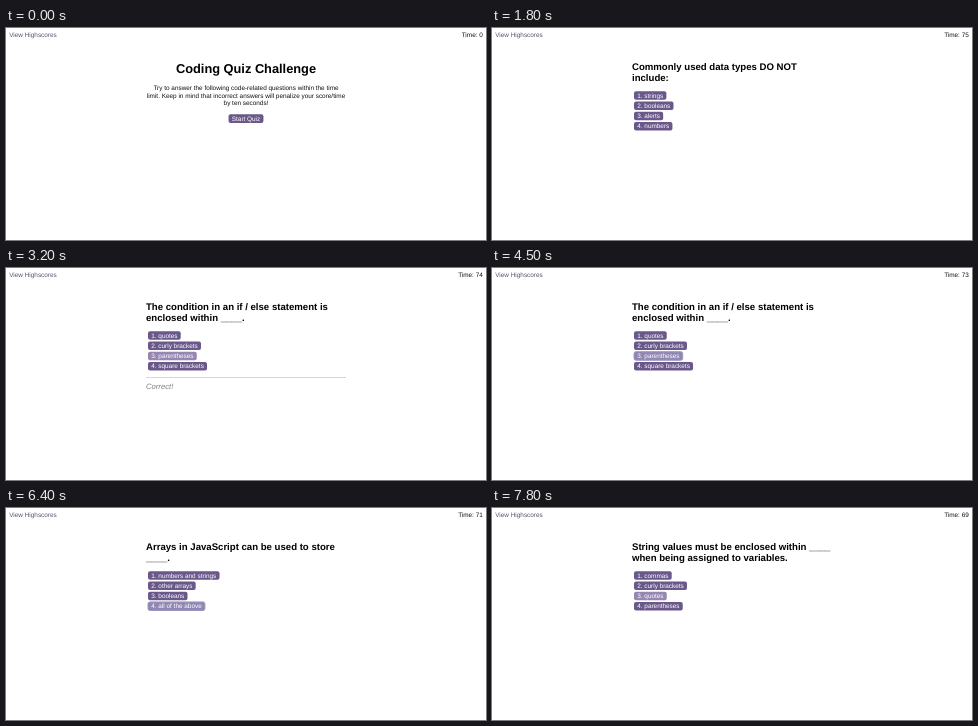
Write an HTML page that moves like this. It is 480x212 px and loops after 8 s.

```html
<!DOCTYPE html>
<html lang="en">
<head>
<meta charset="utf-8">
<title>Coding Quiz</title>
<style>
  html, body { margin: 0; width: 100%; height: 100%; overflow: hidden; background: #fff; }
  svg { display: block; width: 480px; height: 212px; }
  text { font: 16px "Liberation Sans", Arial, sans-serif; text-rendering: geometricPrecision; fill: #111; }
  .h1 { font-size: 32px; font-weight: bold; fill: #000; }
  .h2 { font-size: 24px; font-weight: bold; fill: #000; }
  .mid { text-anchor: middle; }
  .end { text-anchor: end; }
  .link { fill: #5a5270; }
  .label { fill: #fff; }
  .note { font-size: 19.2px; font-style: italic; fill: #808080; }
</style>
</head>
<body>
<svg id="stage" viewBox="0 0 1200 530"></svg>
<script>
const LOOP = 8000;
const QUIZ_START = 1800;
const NOTE_TIME = 1000;
const BASE = [106, 88, 138];
const LIGHT = [150, 135, 177];
const PRESSED = [144, 134, 178];

const questions = [
  { at: 1800, title: ["Commonly used data types DO NOT", "include:"],
    choices: ["strings", "booleans", "alerts", "numbers"] },
  { at: 3200, title: ["The condition in an if / else statement is", "enclosed within ____."],
    choices: ["quotes", "curly brackets", "parentheses", "square brackets"] },
  { at: 4700, title: ["Arrays in JavaScript can be used to store", "____."],
    choices: ["numbers and strings", "other arrays", "booleans", "all of the above"] },
  { at: 6800, title: ["String values must be enclosed within ____", "when being assigned to variables."],
    choices: ["commas", "curly brackets", "quotes", "parentheses"] }
];

// Pointer states: time, button index, highlight amount, pressed
const pointer = [
  [0, 0, 0], [1500, 0, 0.5], [1600, 0, 1], [1700, 0, 1, true],
  [1800, 0, 0], [2600, 2, 0.5], [2700, 2, 1], [3100, 2, 1, true],
  [3200, 2, 1], [4500, 2, 1, true],
  [4700, 2, 0.3], [4800, 2, 1], [5200, 3, 1], [6400, 3, 1, true],
  [6800, 3, 0.3], [6900, 3, 1], [7400, 3, 0], [7500, 2, 1]
];

const stage = document.getElementById("stage");

function add(parent, tag, attrs, content = "") {
  const el = document.createElementNS("http://www.w3.org/2000/svg", tag);
  for (const key in attrs) el.setAttribute(key, attrs[key]);
  el.textContent = content;
  parent.append(el);
  return el;
}

function addText(parent, x, y, cls, content) {
  return add(parent, "text", { x, y, class: cls }, content);
}

function addButton(parent, x, y, label, centred) {
  const rect = add(parent, "rect", { y, height: 21.5, rx: 5, "stroke-width": 2.5 });
  const text = addText(parent, 0, y + 16.2, "label", label);
  const width = text.getComputedTextLength() + 16;
  const left = centred ? x - width / 2 : x;
  rect.setAttribute("x", left);
  rect.setAttribute("width", width);
  text.setAttribute("x", left + 8);
  return rect;
}

function paint(rect, amount, pressed) {
  const mix = BASE.map((c, i) => Math.round(c + (LIGHT[i] - c) * amount));
  rect.setAttribute("fill", `rgb(${pressed ? PRESSED : mix})`);
  rect.setAttribute("stroke", pressed ? "#9a9ac4" : "none");
}

function show(el, visible) {
  el.setAttribute("visibility", visible ? "visible" : "hidden");
}

function lastBefore(list, t, timeOf) {
  let found = null;
  for (const item of list) if (timeOf(item) <= t) found = item;
  return found;
}

addText(stage, 8, 22.5, "link", "View Highscores");
const clock = addText(stage, 1192, 22.5, "end", "");

const intro = { group: add(stage, "g", {}) };
addText(intro.group, 600, 112.3, "h1 mid", "Coding Quiz Challenge");
[
  "Try to answer the following code-related questions within the time",
  "limit. Keep in mind that incorrect answers will penalize your score/time",
  "by ten seconds!"
].forEach((line, i) => addText(intro.group, 600, 156 + 18.2 * i, "mid", line));
intro.buttons = [addButton(intro.group, 600, 215.8, "Start Quiz", true)];

for (const q of questions) {
  q.group = add(stage, "g", {});
  q.title.forEach((line, i) => addText(q.group, 350, 105 + 27.5 * i, "h2", line));
  q.buttons = q.choices.map((c, i) =>
    addButton(q.group, 355, 158 + 25.6 * i, `${i + 1}. ${c}`));
}

const note = add(stage, "g", {});
add(note, "rect", { x: 350, y: 272.5, width: 500, height: 2, fill: "#ccc" });
addText(note, 350, 301.5, "note", "Correct!");

const screens = [intro, ...questions];

function draw(t) {
  const question = lastBefore(questions, t, q => q.at);
  const screen = question || intro;
  const [, row, amount, pressed] = lastBefore(pointer, t, p => p[0]);

  for (const s of screens) show(s.group, s === screen);
  screen.buttons.forEach((b, i) => paint(b, i === row ? amount : 0, i === row && pressed));

  const left = question ? 75 - Math.floor((t - QUIZ_START) / 1000) : 0;
  clock.textContent = `Time: ${left}`;
  show(note, question && question !== questions[0] && t < question.at + NOTE_TIME);
}

const start = performance.now();
function tick() {
  draw((performance.now() - start) % LOOP);
  requestAnimationFrame(tick);
}
tick();
</script>
</body>
</html>
```
